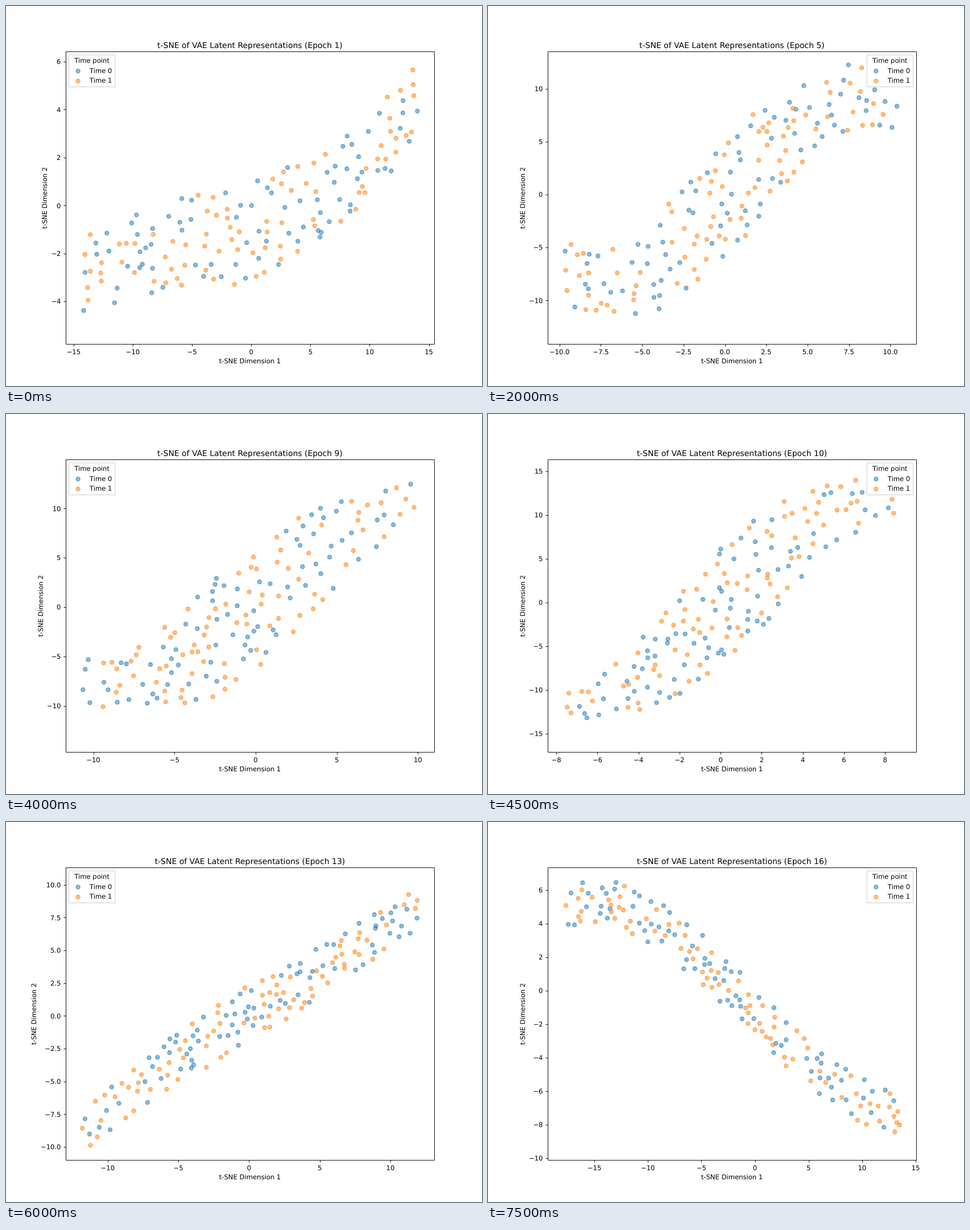
These frames come from a looping animation (837x669 px, 8 s). An HTML page:

```html
<!DOCTYPE html>
<html lang="en">
<head>
<meta charset="utf-8">
<title>Latent scatter by epoch</title>
<style>
  html, body { margin: 0; width: 100%; height: 100%; overflow: hidden; background: #fff; }
  svg { display: block; font: 11.625px "DejaVu Sans", sans-serif; text-rendering: geometricPrecision; }
  .title { font-size: 13.95px; }
  .mid { text-anchor: middle; }
  .end { text-anchor: end; }
  .line { fill: none; stroke: #000; stroke-width: .93; }
  .t0, .t1 { stroke-width: 1.6; fill-opacity: .5; stroke-opacity: .5; }
  .t0 { fill: #1f77b4; stroke: #1f77b4; }
  .t1 { fill: #ff7f0e; stroke: #ff7f0e; }
  .box { fill: #fff; fill-opacity: .8; stroke: #ccc; stroke-opacity: .8; stroke-width: 1.16; }
</style>
</head>
<body>
<svg id="plot" width="837" height="669" viewBox="0 0 837 669"></svg>
<script>
const HOLD = 500, EPOCHS = 16, COUNT = 160, EM = 11.625;
const frameBox = { left: 104.6, right: 753.3, top: 80.3, bottom: 595.4 };
const dataBox = { left: 134.1, right: 723.8, top: 103.7, bottom: 572 };
const MID = (frameBox.left + frameBox.right) / 2;
const legendRight = [2, 3, 4, 5, 8, 10, 16];

// Key epochs: data limits in x and y, four heights along the cloud, half thickness, bulge
const keys = {
  1: [-14.27, 14.05, -5.23, 5.86, 478, 415, 355, 150, 80, 10],
  3: [-10.29, 11.92, -12.4, 11.55, 410, 450, 245, 210, 85, 0],
  7: [-9.13, 9.21, -13.37, 12.94, 512, 402, 215, 134, 75, 45],
  9: [-10.68, 9.98, -13.36, 13.6, 470, 418, 268, 155, 75, 35],
  11: [-4.54, 7.43, -17.81, 16, 556, 403, 205, 142, 65, 35],
  14: [-15.43, 14.17, -6.09, 7.45, 535, 398, 312, 150, 36, -8],
  16: [-17.81, 13.5, -9.33, 6.55, 150, 205, 392, 510, 42, 4]
};

const lerp = (a, b, t) => a + (b - a) * t;

// Epochs between two keys blend them
function settings(epoch) {
  const known = Object.keys(keys).map(Number);
  const a = known.filter(k => k <= epoch).pop(), b = known.find(k => k >= epoch);
  return keys[a].map((v, i) => lerp(v, keys[b][i], a === b ? 0 : (epoch - a) / (b - a)));
}

// Cubic through four evenly spaced heights
function cubic([a, b, c, d], t) {
  const s = 3 * t, p = s - 1, q = s - 2, r = s - 3;
  return (-a * p * q * r + 3 * b * s * q * r - 3 * c * s * p * r + d * s * p * q) / 6;
}

function seeded(seed) {
  return () => {
    seed = seed + 0x6d2b79f5 | 0;
    let t = Math.imul(seed ^ seed >>> 15, seed | 1);
    t ^= t + Math.imul(t ^ t >>> 7, t | 61);
    return ((t ^ t >>> 14) >>> 0) / 4294967296;
  };
}

// Evenly spread random points: keep the candidate farthest from the others
function scatter(epoch, heights, thick, bulge, legendX) {
  const rnd = seeded(epoch * 977), points = [];
  const pick = () => {
    for (;;) {
      const t = rnd();
      const x = lerp(dataBox.left, dataBox.right, t), y = lerp(dataBox.top, dataBox.bottom, rnd());
      const covered = x > legendX - 5 && x < legendX + 87 && y < 147;
      const reach = thick - bulge * Math.cos(2 * Math.PI * t);
      if (!covered && Math.abs(y - cubic(heights, t)) < reach) return [x, y];
    }
  };
  const gap = p => Math.min(...points.map(q => Math.hypot(p[0] - q[0], p[1] - q[1])));
  while (points.length < COUNT) {
    const tries = [pick(), pick(), pick()];
    points.push(tries.reduce((a, b) => gap(b) > gap(a) ? b : a));
  }
  return points;
}

// At most nine intervals with a round step, as [pixel, label]
function ticks(from, to, start, end) {
  const pad = (to - from) / 20, low = from - pad, high = to + pad;
  const step = [1, 2, 2.5, 5, 10].find(s => s >= (high - low) / 9);
  const list = [];
  for (let i = Math.ceil(low / step); i * step <= high; i++) {
    const v = i * step;
    const label = (v < 0 ? "−" : "") + Math.abs(v).toFixed(step % 1 ? 1 : 0);
    list.push([lerp(start, end, (v - from) / (to - from)), label]);
  }
  return list;
}

const snap = v => Math.round(v) + .5;
const glyph = c => c === "−" ? .838 : c === "." ? .318 : .636;
const width = s => EM * [...s].reduce((sum, c) => sum + glyph(c), 0);
const text = (x, y, s, cls = "", extra = "") =>
  `<text x="${x}" y="${y}" class="${cls}" ${extra}>${s}</text>`;
const dot = (x, y, kind) =>
  `<circle cx="${x.toFixed(1)}" cy="${y.toFixed(1)}" r="3.49" class="t${kind}"/>`;

function legend(x) {
  let out = `<rect class="box" x="${x}" y="86.1" width="81.4" height="56.2" rx="2.3"/>`;
  out += text(x + 40.7, 100, "Time point", "mid");
  for (const kind of [0, 1]) {
    const y = 114.5 + kind * 17.5;
    out += dot(x + 16.3, y, kind) + text(x + 36.6, y + 3.3, "Time " + kind);
  }
  return out;
}

function draw(epoch) {
  const [x0, x1, y0, y1, ...shape] = settings(epoch);
  const legendX = legendRight.includes(epoch) ? 666.1 : 110.4;
  const points = scatter(epoch, shape.slice(0, 4), shape[4], shape[5], legendX);
  const xs = ticks(x0, x1, dataBox.left, dataBox.right);
  const ys = ticks(y0, y1, dataBox.bottom, dataBox.top);
  const labelX = 89.1 - Math.max(...ys.map(([, s]) => width(s)));
  const [l, r, t, b] = ["left", "right", "top", "bottom"].map(side => snap(frameBox[side]));
  let out = "", lines = `M${l} ${t}H${r}V${b}H${l}Z`;

  for (const kind of [0, 1])
    points.forEach(([x, y], i) => { if (i % 2 === kind) out += dot(x, y, kind); });

  for (const [x, s] of xs) {
    lines += `M${snap(x)} ${b}v4`;
    out += text(x, 613, s, "mid");
  }
  for (const [y, s] of ys) {
    lines += `M${l} ${snap(y)}h-4`;
    out += text(96.5, y + 4.4, s, "end");
  }
  out += `<path class="line" d="${lines}"/>`;
  out += text(MID, 74, `t-SNE of VAE Latent Representations (Epoch ${epoch})`, "mid title");
  out += text(MID, 629, "t-SNE Dimension 1", "mid");
  out += text(0, 0, "t-SNE Dimension 2", "mid", `transform="translate(${labelX} 338) rotate(-90)"`);
  return out + legend(legendX);
}

const plot = document.getElementById("plot");
const pages = Array.from({ length: EPOCHS }, (_, i) => draw(i + 1));
const start = performance.now();
let shown = -1;

function frame() {
  const page = Math.floor((performance.now() - start) / HOLD) % EPOCHS;
  if (page !== shown) plot.innerHTML = pages[shown = page];
  requestAnimationFrame(frame);
}
frame();
</script>
</body>
</html>
```
